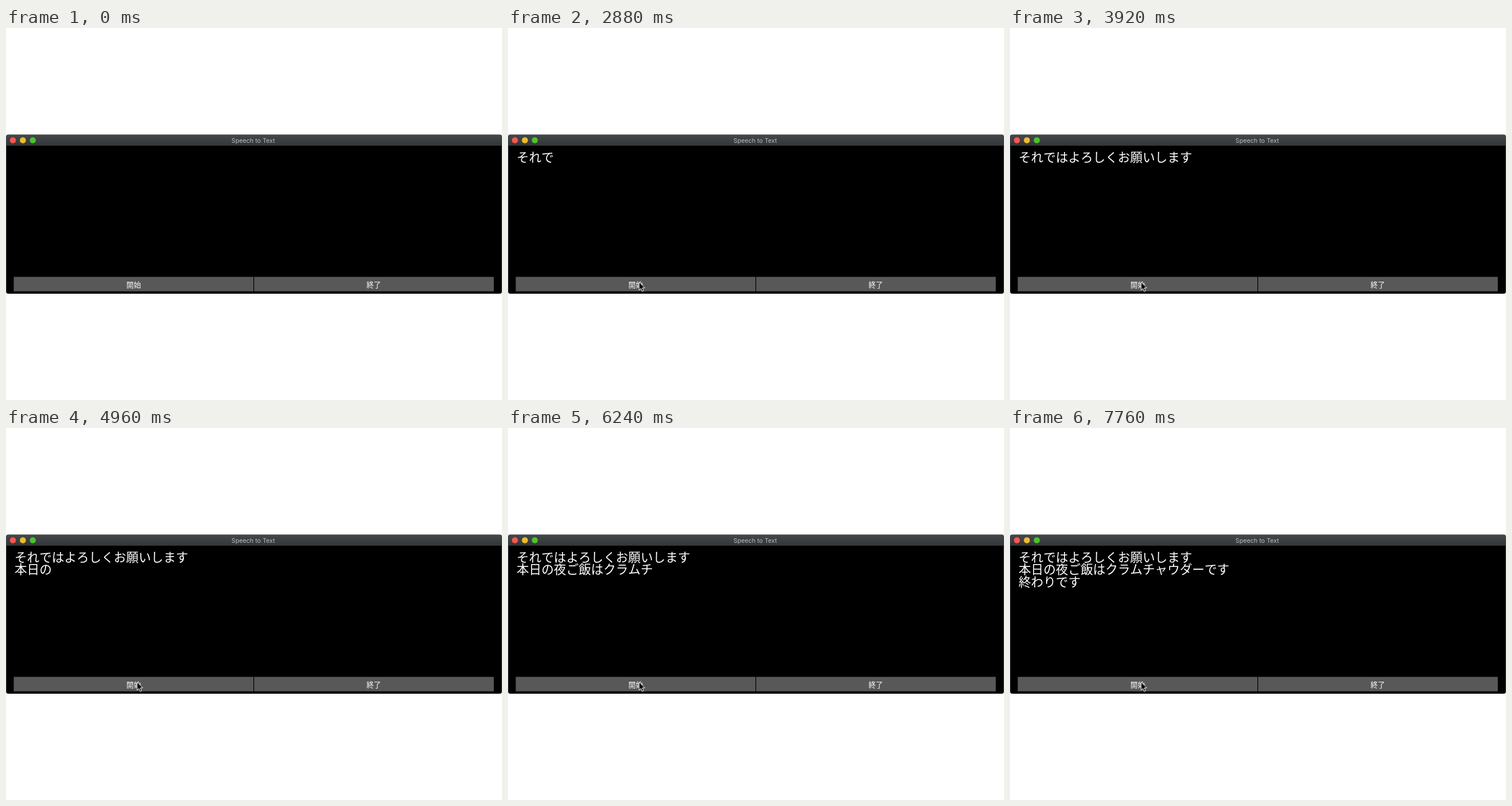
Recreate the animation shown at these times as an HTML page. Size 864 px wide and 648 px high, loop 8000 ms.

```html
<!DOCTYPE html>
<html lang="ja">
<head>
<meta charset="utf-8">
<title>Speech to Text</title>
<style>
  html, body { margin: 0; width: 100%; height: 100%; overflow: hidden; background: #fff; }
  svg { display: block; width: 864px; height: 648px; }
  text { font-family: "Noto Sans CJK JP", "Noto Sans CJK", sans-serif; font-kerning: none; fill: #fff; white-space: pre; }
  .title { font: 10.7px Inter, Roboto, sans-serif; fill: #babcbd; text-anchor: middle; }
  .button { fill: #585858; }
  .label { font-size: 12.7px; text-anchor: middle; }
  .line { font-size: 21.6px; }
</style>
</head>
<body>
<svg viewBox="0 0 864 648">
  <defs>
    <linearGradient id="bar" x2="0" y2="1">
      <stop offset="0" stop-color="#434749"/>
      <stop offset="1" stop-color="#323638"/>
    </linearGradient>
  </defs>

  <rect y="185.5" width="864" height="277.5" rx="4" fill="#4b5555"/>
  <path d="M.8 205H863.2V459a3.5 3.5 0 0 1-3.5 3.5H4.3a3.5 3.5 0 0 1-3.5-3.5Z"/>
  <path d="M.5 205V190a3.7 3.7 0 0 1 3.7-3.7H859.8a3.7 3.7 0 0 1 3.7 3.7V205Z" fill="url(#bar)"/>
  <circle cx="12" cy="195.5" r="5.3" fill="#fb5650"/>
  <circle cx="29.4" cy="195.5" r="5.3" fill="#eabd2c"/>
  <circle cx="46.7" cy="195.5" r="5.3" fill="#4bc32c"/>
  <text class="title" x="430.7" y="199.7">Speech to Text</text>

  <rect class="button" x="13.5" y="433.5" width="417.5" height="25.2"/>
  <rect class="button" x="432.2" y="433.5" width="417.5" height="25.2"/>
  <text class="label" x="222.4" y="451.6">開始</text>
  <text class="label" x="640.6" y="451.6">終了</text>

  <text class="line" x="15" y="232.5"></text>
  <text class="line" x="15" y="254.1"></text>
  <text class="line" x="15" y="275.7"></text>

  <path id="cursor" d="M0 0V14.2L3.2 11.2L5.4 16.3L7.8 15.3L5.6 10.3H10Z"
        fill="#000" stroke="#fff" stroke-width="1" stroke-linejoin="round"/>
</svg>
<script>
  const LOOP = 8000, TICK = 80;

  // Each run: line, start time, chunks that appear one tick apart.
  const runs = [
    [0, 2880, "それで|は"],
    [0, 3360, "よ|ろ|し|く|お|願い|し|ます"],
    [1, 4800, "本"],
    [1, 4960, "日の"],
    [1, 5360, "夜|ご飯"],
    [1, 5600, "は"],
    [1, 6160, "クラ|ムチ|ャウ|ダー"],
    [1, 6560, "です"],
    [2, 7680, "終わり|です"]
  ];
  const lines = [...document.querySelectorAll(".line")];
  const cursor = document.getElementById("cursor");
  const from = { x: 274.5, y: 280.5 }, to = { x: 228.3, y: 442.5 };

  function drawText(t) {
    const shown = lines.map(() => "");
    for (const [line, start, chunks] of runs) {
      const count = Math.max(0, Math.floor((t - start) / TICK) + 1);
      shown[line] += chunks.split("|").slice(0, count).join("");
    }
    lines.forEach((el, i) => {
      if (el.textContent !== shown[i]) el.textContent = shown[i];
    });
  }

  function drawCursor(t) {
    const step = Math.min(8, Math.floor(t / TICK) - 1);
    const ease = 1 - (1 - step / 8) ** 2;
    const x = from.x + (to.x - from.x) * ease;
    const y = from.y + (to.y - from.y) * ease;
    cursor.setAttribute("visibility", step < 0 ? "hidden" : "visible");
    cursor.setAttribute("transform", `translate(${x} ${y})`);
  }

  function frame() {
    const t = performance.now() % LOOP;
    drawText(t);
    drawCursor(t);
    requestAnimationFrame(frame);
  }
  frame();
</script>
</body>
</html>
```
